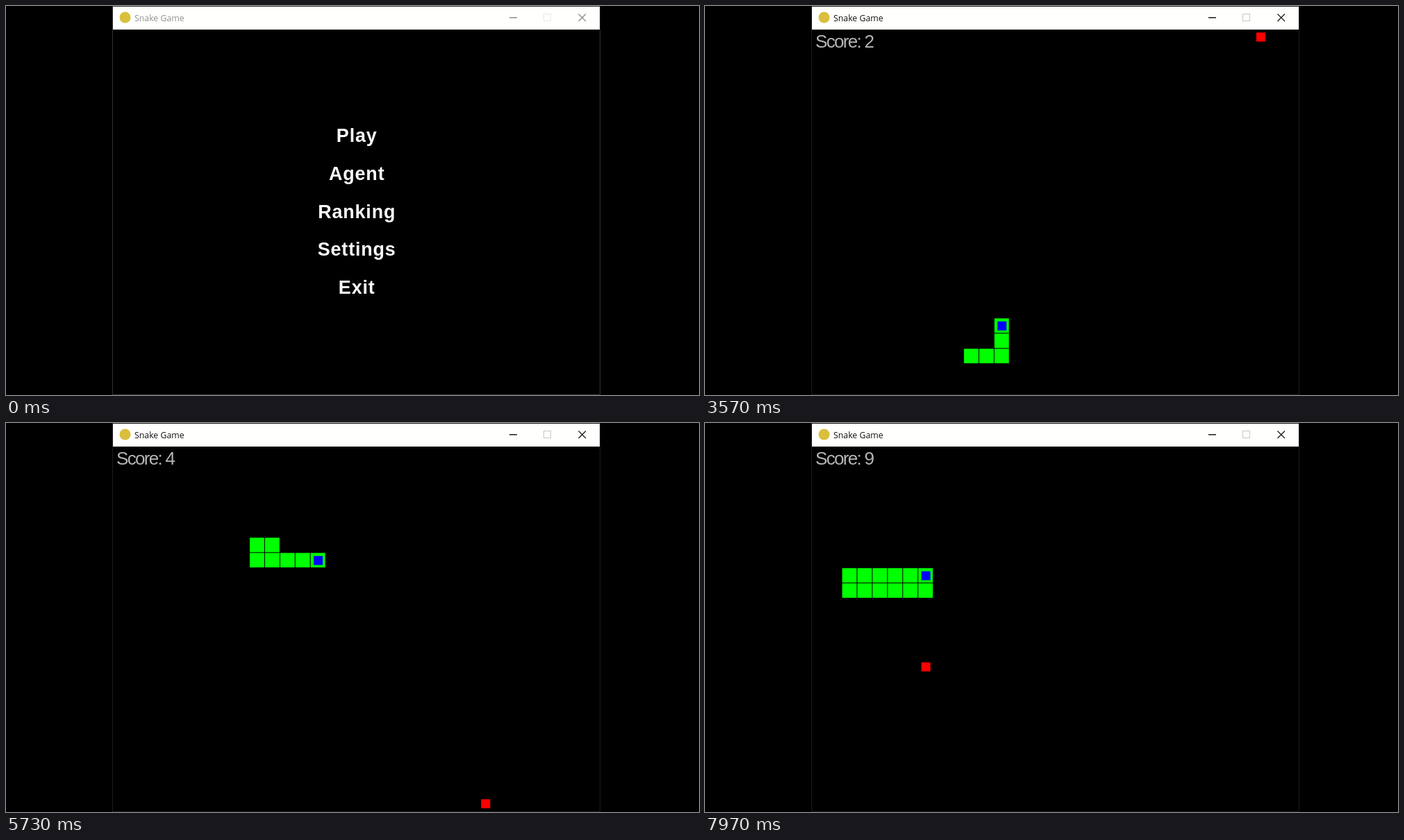
Animation, 998 px wide and 561 px high, one loop 8 s. Source, as an HTML page with a canvas:

```html
<!DOCTYPE html>
<html lang="en">
<head>
<meta charset="utf-8">
<title>Snake Game</title>
<style>
  html, body { margin: 0; width: 100%; height: 100%; overflow: hidden; background: #000; }
  canvas { display: block; }
</style>
</head>
<body>
<canvas id="stage" width="998" height="561"></canvas>
<script>
const ctx = document.getElementById('stage').getContext('2d');

const LOOP = 8000, FPS = 30;
const CELL = 21.925, LEFT = 153.6, TOP = 33.8;
const CURSOR_IN = 35, CURSOR_STOP = 39, MENU_END = 45, GAME_START = 57, RUN_START = 62;
const MENU = ['Play', 'Agent', 'Ranking', 'Settings', 'Exit'];

// Each food, preceded by the detours taken on the way to it
const TRIPS = [
  [[28, 10]],
  [[10, 20]],
  [[10, 21], [12, 21], [29, 0]],
  [[9, 6]],
  [[9, 7], [24, 7], [24, 23]],
  [[16, 23], [16, 17]],
  [[7, 9]],
  [[2, 9]],
  [[5, 8]],
  [[7, 8], [7, 14]]
];

// The snake lies along the route and steers vertically first, then horizontally
const route = [[14, 12], [15, 12], [16, 12]];
const HOME = route.length - 1;
const foods = TRIPS.map(stops => {
  for (const [x, y] of stops) {
    let [cx, cy] = route[route.length - 1];
    while (cy !== y) route.push([cx, cy += Math.sign(y - cy)]);
    while (cx !== x) route.push([cx += Math.sign(x - cx), cy]);
  }
  return { cell: stops[stops.length - 1], reachedAt: route.length - 1 };
});

// One cell per tick, plus a slowly growing lead
function headAt(tick) {
  const steps = Math.max(0, tick - RUN_START);
  const lead = 0.473 * Math.sqrt(Math.max(0, steps - 9));
  return HOME + steps + Math.floor(lead);
}

function rect(x, y, w, h, color) {
  ctx.fillStyle = color;
  ctx.fillRect(x, y, w, h);
}

function text(string, x, y, font, color, spacing = 0, align = 'left') {
  ctx.font = font;
  ctx.fillStyle = color;
  ctx.letterSpacing = spacing + 'px';
  ctx.textAlign = align;
  ctx.fillText(string, x, y);
}

function square([col, row], inset, size, color) {
  rect(LEFT + col * CELL + inset, TOP + row * CELL + inset, size, size, color);
}

function drawWindow(active) {
  rect(0, 0, 998, 561, '#000');
  ctx.lineWidth = 1;
  ctx.strokeStyle = active ? '#1c1c1c' : '#333';
  ctx.strokeRect(153.5, 0.5, 702, 560);
  rect(154, 1, 701, 33, '#fffffd');

  ctx.fillStyle = '#d9bf3c';
  ctx.beginPath();
  ctx.arc(171.5, 16.5, 8, 0, 2 * Math.PI);
  ctx.fill();
  text('Snake Game', 185, 21.5, '12.3px "Open Sans", sans-serif', active ? '#111' : '#929292');

  const ink = active ? '#1a1a1a' : '#8c8c8c';
  rect(725, 16, 11, 1.5, ink);
  ctx.strokeStyle = active ? '#c6c6c6' : '#e9e9e9';
  ctx.strokeRect(774.5, 11.5, 10, 10);
  ctx.strokeStyle = ink;
  ctx.lineWidth = 1.3;
  ctx.beginPath();
  ctx.moveTo(824.5, 11.5); ctx.lineTo(835, 22);
  ctx.moveTo(835, 11.5); ctx.lineTo(824.5, 22);
  ctx.stroke();
}

function drawMenu() {
  MENU.forEach((label, i) => text(label, 505.2, 196 + i * 54.8,
    'bold 27px "Liberation Sans", Arial, sans-serif', '#fafafa', 0.8, 'center'));
}

function drawCursor(tick) {
  const k = Math.min(1, (tick - CURSOR_IN) / (CURSOR_STOP - CURSOR_IN));
  ctx.save();
  ctx.translate(581 - 47 * k, 523 - 282 * k);
  ctx.fillStyle = '#fff';
  ctx.fill(new Path2D('M0 0V16L4 12.5L6.5 18.5L9 17.5L6.5 11.5H11.5Z'));
  ctx.restore();
}

function drawGame(tick) {
  const head = headAt(tick);
  const score = foods.filter(food => food.reachedAt <= head).length;

  text('Score: ' + score, 159, 60, '26px "Liberation Sans", Arial, sans-serif', '#b5b5b5', -1.7);
  square(foods[score].cell, 4.5, 13, '#f00');
  const body = route.slice(head - score - HOME, head + 1);
  for (const cell of body) square(cell, 0.1, 20.9, '#0f0');
  square(route[head], 4.5, 13, '#00f');
}

function draw(ms) {
  const tick = Math.floor((ms + 4) % LOOP * FPS / 1000);
  drawWindow(tick >= MENU_END);
  if (tick < MENU_END) {
    drawMenu();
    if (tick >= CURSOR_IN) drawCursor(tick);
  } else if (tick >= GAME_START) {
    drawGame(tick);
  }
}

const start = performance.now();
function loop() {
  draw(performance.now() - start);
  requestAnimationFrame(loop);
}
loop();
</script>
</body>
</html>
```
